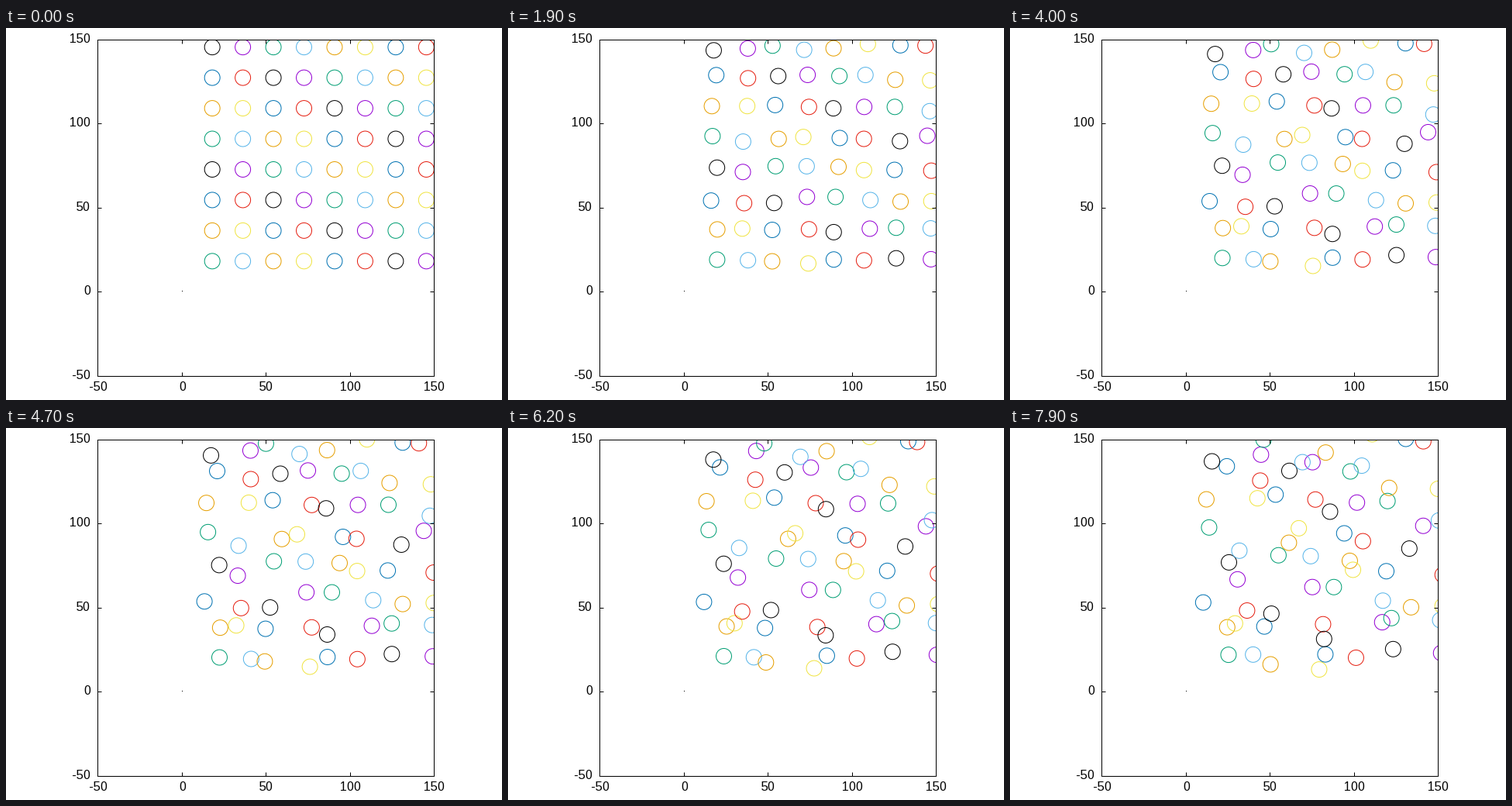
Write a matplotlib script that moves like this. It is 640 px wide and 480 px high and loops after 8000 ms.

```python
import numpy as np
import matplotlib.pyplot as plt
from matplotlib.animation import FuncAnimation
from matplotlib.patches import Circle

W, H, DPI = 640, 480, 100
FRAMES, STEP_MS = 80, 100
LO, HI, SIDE = -50, 150, 434      # axis range and its length in pixels
PX = (HI - LO) / SIDE             # data units per pixel
LINE = 72 / DPI                   # one pixel in points

N = 8                             # visible particles per row and column
GAP = 200 / 11                    # lattice spacing
RADIUS = 4.6
SPEED = 1.014                     # equal for all particles at the start
SIGMA, EPSILON = 5, 7             # Lennard-Jones size and depth
SUBSTEPS = 10

COLORS = ["#9400d3", "#009e73", "#56b4e9", "#e69f00",
          "#f0e442", "#0072b2", "#e51e10", "#000000"]

# Starting direction of each particle in degrees, bottom row first
HEADINGS = [
    27, 16, 183, -45, 150, 166, 119, 36,
    21, 142, 168, 24, 209, 36, 119, 43,
    190, 257, 246, 73, 109, -1, -29, -21,
    33, 232, 87, 78, 53, 192, 188, -23,
    123, 238, -1, 145, 15, 180, -46, 108,
    138, 43, 95, 25, 181, 155, 155, -63,
    52, -10, 30, 60, 30, 122, 220, -55,
    260, -25, 153, 235, 201, 77, 35, 151,
]


def acceleration(pos):
    """Lennard-Jones pull and push between all pairs of unit masses."""
    gap = pos[:, None] - pos
    r2 = np.abs(gap) ** 2
    np.fill_diagonal(r2, np.inf)
    s6 = (SIGMA ** 2 / r2) ** 3
    return (24 * EPSILON * (2 * s6 ** 2 - s6) / r2 * gap).sum(axis=1)


def simulate():
    """Positions of all particles for every frame (velocity Verlet)."""
    row, col = np.divmod(np.arange(N * N), N)
    pos = GAP * (col + 1 + 1j * (row + 1))
    vel = SPEED * np.exp(1j * np.radians(HEADINGS))
    acc = acceleration(pos)
    dt = STEP_MS / 1000 / SUBSTEPS
    track = []
    for _ in range(FRAMES):
        track.append(pos)
        for _ in range(SUBSTEPS):
            vel = vel + acc * dt / 2
            pos = pos + vel * dt
            acc = acceleration(pos)
            vel = vel + acc * dt / 2
    return track


track = simulate()

plt.rcParams["text.hinting_factor"] = 1
fig = plt.figure(figsize=(W / DPI, H / DPI), dpi=DPI, facecolor="white")
ax = fig.add_axes([118.2 / W, 31.2 / H, SIDE / W, SIDE / H])
ax.set(xlim=(LO, HI), ylim=(LO, HI))

ticks = range(LO, HI + 1, 50)
ax.set_xticks(ticks)
ax.set_yticks(ticks)
ax.tick_params(direction="in", length=3.4, width=LINE, top=True, right=True,
               labelbottom=False, labelleft=False)
for spine in ax.spines.values():
    spine.set(linewidth=LINE, antialiased=False)

font = dict(family="Liberation Sans", size=16 * LINE, va="baseline")
for v in ticks:
    ax.text(v + 0.7 * PX, LO - 19.3 * PX, str(v), ha="center", **font)
    ax.text(LO - 9 * PX, v - 4 * PX, str(v), ha="right", **font)

ax.plot([0], [0], ",", color="black")

circles = []
for k, p in enumerate(track[0]):
    row, col = divmod(k, N)
    # the full lattice is ten wide, so each row shifts the colours by two
    color = COLORS[(10 * row + col + 1) % len(COLORS)]
    circles.append(ax.add_patch(
        Circle((p.real, p.imag), RADIUS, fill=False, ec=color, lw=LINE)))


def update(i):
    for circle, p in zip(circles, track[i]):
        circle.center = p.real, p.imag
    return circles


anim = FuncAnimation(fig, update, frames=FRAMES, interval=STEP_MS,
                     repeat=True, repeat_delay=0, blit=False)
plt.show()
```
